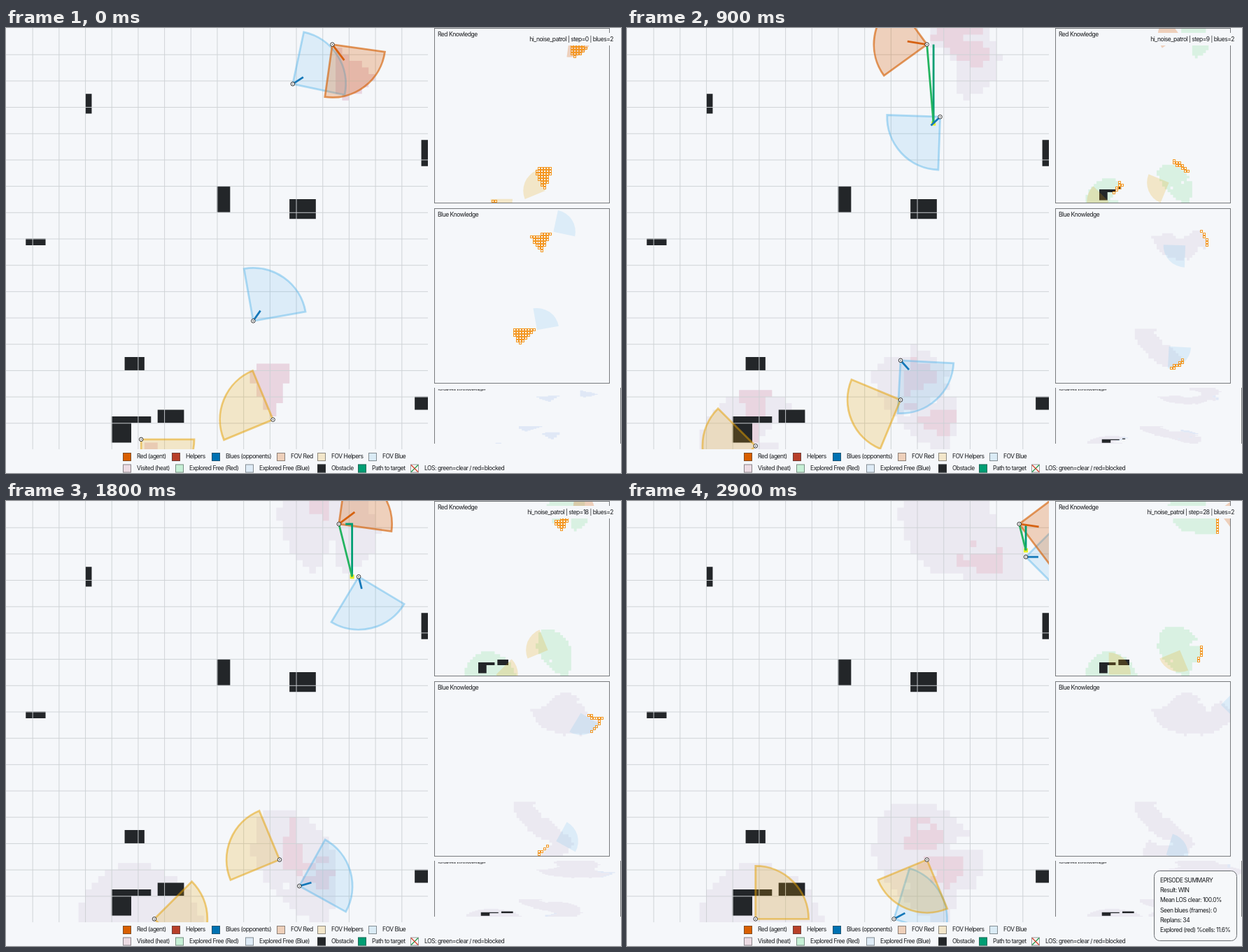
Animation, 879 px wide and 637 px high, one loop 3000 ms. Source, as an HTML page with a canvas:

```html
<!DOCTYPE html>
<html lang="en">
<head>
<meta charset="utf-8">
<title>Patrol</title>
<style>
html, body { margin: 0; width: 879px; height: 637px; overflow: hidden; background: #f5f7fa; }
canvas { display: block; }
</style>
</head>
<body>
<canvas id="stage" width="879" height="637"></canvas>
<script>
const ctx = document.getElementById('stage').getContext('2d');
const N = 64, LAST = 28, BG = '#f5f7fa', INK = '#232629', LILAC = '#ebe9f1';
const KEYS = [0, 6, 9, 14, 18, 25, 28];
const rad = deg => deg * Math.PI / 180;

// Panels: left, top, cell width, cell height
const MAP = [0, 0, 603 / N, 603 / N];
const REDP = [612.5, 0.5, 250 / N, 250 / N];
const BLUEP = [612.5, 258.5, 250 / N, 250 / N];
const SHARED = [612, 515, 267 / N, 80 / N];

// Cell, drawn heading and scanning direction of each agent at KEYS
const agents = [
  { team: 'blue', x: [43, 44, 47, 49, 53, 59, 60], y: [8, 12, 13, 10, 11, 6, 8],
    a: [-33, 121, 137, 41, 76, 64, 0], look: [143, -10, -20, -290, -322, -295, -250] },
  { team: 'blue', x: [37, 38, 41, 44, 44, 40, 40], y: [44, 48, 50, 54, 58, 63, 63],
    a: [-55, 27, 48, 53, -16, -72, -28], look: [163, 75, 65, 60, 125, 200, 200] },
  { team: 'help', x: [40, 41, 41, 41, 41, 43, 45], y: [59, 58, 56, 55, 54, 54, 54],
    a: [202.5, 202.5, 157.5, 157.5, 202.5, 157.5, 112.5], off: 22.5,
    look: s => -34 - 59 * Math.cos(2 * Math.PI * s / 5) },
  { team: 'help', x: [20, 19, 19, 20, 22, 20, 19], y: [62, 63, 63, 63, 63, 63, 63],
    a: [45, 225, 180, 90, 0, -45, -45], off: 0, look: [45, 247, 290, 360, 450, 450, 450] },
  { team: 'red', x: [49, 45, 45, 48, 50, 56, 59], y: [2, 2, 2, 3, 3, 3, 3],
    a: [53, 143, 189, 234, 323, 368, 368], look: [58, -22, -60, -90, -220, -250, -250] }
];
const target = { x: [43, 43, 46, 48, 52, 58, 60], y: [8, 13, 14, 9, 11, 6, 7] };
const style = {
  blue: { rgb: '86,180,233', fill: 0.16, line: 0.45, head: 'rgb(20,120,185)', len: 1.9 },
  help: { rgb: '230,159,0', fill: 0.2, line: 0.5 },
  red: { rgb: '213,94,0', fill: 0.25, line: 0.62, head: 'rgb(214,98,16)', len: 3 }
};
const walls = [[12, 10, 1, 3], [63, 17, 1, 4], [32, 24, 2, 4], [43, 26, 4, 3], [3, 32, 3, 1],
  [18, 50, 3, 2], [62, 56, 2, 2], [16, 59, 6, 1], [16, 60, 3, 3], [23, 58, 4, 2]];
const isWall = (x, y) => walls.some(([l, t, w, h]) => x >= l && x < l + w && y >= t && y < t + h);

function lerp(list, step) {
  let i = KEYS.length - 2;
  while (i > 0 && KEYS[i] > step) i--;
  return list[i] + (list[i + 1] - list[i]) * (step - KEYS[i]) / (KEYS[i + 1] - KEYS[i]);
}

function pose(o, step) {
  const p = { x: Math.round(lerp(o.x, step)) + 0.5, y: Math.round(lerp(o.y, step)) + 0.5, team: o.team };
  if (o.a) {
    let a = lerp(o.a, step);
    if (o.off !== undefined) a = Math.round((a - o.off) / 45) * 45 + o.off;
    p.a = rad(a);
  }
  return p;
}

// Scan the field once: step of first sight per cell, and heat after each step
const first = { red: new Array(N * N).fill(99), blue: new Array(N * N).fill(99) };
const heat = [];
for (let s = 0; s <= LAST; s++) {
  heat[s] = s ? heat[s - 1].map(h => h * 0.92) : new Array(N * N).fill(0);
  for (const o of agents) {
    const p = pose(o, s), side = o.team === 'blue' ? 'blue' : 'red';
    const look = rad(typeof o.look === 'function' ? o.look(s) : lerp(o.look, s));
    for (let i = 0; i < N * N; i++) {
      const dx = i % N + 0.5 - p.x, dy = Math.floor(i / N) + 0.5 - p.y, d = Math.hypot(dx, dy);
      if (d < 1 || d > 8.3 || Math.cos(Math.atan2(dy, dx) - look) < Math.cos(rad(24))) continue;
      first[side][i] = Math.min(first[side][i], s);
      if (side === 'red') heat[s][i]++;
    }
  }
}

function fillRects(P, list, color) {
  ctx.beginPath();
  for (const [x, y, w, h] of list) ctx.rect(P[0] + x * P[2], P[1] + y * P[3], w * P[2], h * P[3]);
  ctx.fillStyle = color;
  ctx.fill();
}

// Cells passing a test, joined into one rectangle per run
function runs(test) {
  const out = [];
  for (let y = 0; y < N; y++)
    for (let x = 0, from = -1; x <= N; x++) {
      const hit = x < N && test(y * N + x);
      if (hit && from < 0) from = x;
      if (!hit && from >= 0) { out.push([from, y, x - from, 1]); from = -1; }
    }
  return out;
}

const drawFound = (P, step) =>
  fillRects(P, runs(i => first.red[i] <= step && isWall(i % N, Math.floor(i / N))), INK);

function outlineCells(P, list) {
  ctx.strokeStyle = 'rgb(244,152,36)';
  ctx.lineWidth = 1;
  for (const [x, y, w] of list)
    for (let i = x; i < x + w; i++)
      ctx.strokeRect(Math.floor(P[0] + i * P[2]) + 0.5, Math.floor(P[1] + y * P[3]) + 0.5, 3, 3);
}

function wedge(P, p, edge) {
  const s = style[p.team], x = P[0] + p.x * P[2], y = P[1] + p.y * P[3];
  ctx.beginPath();
  ctx.moveTo(x, y);
  ctx.arc(x, y, 8.05 * P[2], p.a - Math.PI / 4, p.a + Math.PI / 4);
  ctx.closePath();
  ctx.fillStyle = `rgba(${s.rgb},${s.fill})`;
  ctx.fill();
  if (!edge) return;
  ctx.strokeStyle = `rgba(${s.rgb},${s.line})`;
  ctx.lineWidth = 2.8;
  ctx.stroke();
}

function line(pts, color, width) {
  ctx.beginPath();
  pts.forEach(([x, y]) => ctx.lineTo(x, y));
  ctx.strokeStyle = color;
  ctx.lineWidth = width;
  ctx.stroke();
}

function text(s, x, y, align = 'left') {
  ctx.fillStyle = '#17191c';
  ctx.textAlign = align;
  ctx.fillText(s, x, y);
}

function clipped(x, y, w, h, draw) {
  ctx.save();
  ctx.beginPath();
  ctx.rect(x, y, w, h);
  ctx.clip();
  draw();
  ctx.restore();
}

function drawMap(step, team) {
  const C = MAP[2], at = (x, y) => [x * C, y * C];
  const peak = Math.max(...heat[step]);
  fillRects(MAP, runs(i => first.red[i] <= step), LILAC);
  fillRects(MAP, runs(i => heat[step][i] > 0.6 * peak), 'rgba(232,200,213,.6)');
  fillRects(MAP, walls, INK);
  for (let i = 1; i < 16; i++) {
    const g = i * 4 * C + 0.47;
    line([[g, 0], [g, 603]], '#cdd2d5', 0.94);
    line([[0, g], [603, g]], '#cdd2d5', 0.94);
  }
  team.forEach(p => wedge(MAP, p, true));
  if (step > 0) {
    const r = team[4], t = pose(target, step), dx = Math.sign(t.x - r.x);
    fillRects(MAP, [[t.x - 0.32, t.y - 0.32, 0.64, 0.64]], '#e6f020');
    line([at(r.x + dx, r.y), at(t.x, r.y), at(t.x, t.y)], 'rgb(0,158,115)', 2.8);
    line([at(r.x, r.y), at(t.x, t.y)], 'rgb(36,180,96)', 2.8);
  }
  for (const p of team) {
    const s = style[p.team];
    if (s.head) line([at(p.x, p.y), at(p.x + s.len * Math.cos(p.a), p.y + s.len * Math.sin(p.a))], s.head, 2.8);
  }
  for (const p of team) {
    ctx.beginPath();
    ctx.arc(...at(p.x, p.y), 2.8, 0, 7);
    ctx.fillStyle = '#fff';
    ctx.fill();
    ctx.strokeStyle = '#333';
    ctx.lineWidth = 1;
    ctx.stroke();
    fillRects(MAP, [[p.x - 0.07, p.y - 0.07, 0.14, 0.14]], '#333');
  }
}

function drawPanel(P, side, step, team, title, color) {
  clipped(P[0], P[1], 250, 250, () => {
    fillRects(P, runs(i => first[side][i] < step), color);
    if (side === 'red') drawFound(P, step);
    team.forEach(p => { if ((p.team === 'blue') === (side === 'blue')) wedge(P, p); });
    outlineCells(P, runs(i => first[side][i] === step));
  });
  ctx.strokeStyle = '#777a7d';
  ctx.lineWidth = 1;
  ctx.strokeRect(P[0], P[1], 250, 250);
  text(title, 617, P[1] + 11.5);
}

function drawShared(step) {
  clipped(612, 515, 267, 80, () => {
    const known = i => Math.min(first.red[i], first.blue[i]);
    fillRects(SHARED, runs(i => known(i) < step), LILAC);
    fillRects(SHARED, runs(i => known(i) === step), '#e0e8f6');
    drawFound(SHARED, step);
    // The whole panel, title included, is squashed
    ctx.translate(0, 515);
    ctx.scale(1, 80 / 250);
    text('Shared Knowledge', 617, 14);
  });
  line([[612.5, 515], [612.5, 595]], '#777a7d', 1);
  line([[878.5, 515], [878.5, 595]], '#777a7d', 1);
}

const legend = [
  [167, 0, 'Red (agent)', '#d95f02'], [237, 0, 'Helpers', '#b8402a'], [294, 0, 'Blues (opponents)', '#0072b2'],
  [387, 0, 'FOV Red', '#eed0ba'], [445, 0, 'FOV Helpers', '#f2e6ca'], [518, 0, 'FOV Blue', '#daebf5'],
  [167, 1, 'Visited (heat)', '#ecdce4'], [242, 1, 'Explored Free (Red)', '#c6f0d6'],
  [342, 1, 'Explored Free (Blue)', '#deebf6'], [445, 1, 'Obstacle', INK],
  [503, 1, 'Path to target', '#009e73'], [578, 1, 'LOS: green=clear / red=blocked', '#fff']
];

function drawLegend() {
  for (const [x, row, label, color] of legend) {
    const y = 608 + row * 16.5;
    ctx.fillStyle = color;
    ctx.fillRect(x, y, 12, 12);
    ctx.strokeStyle = 'rgba(60,64,68,.55)';
    ctx.lineWidth = 1;
    ctx.strokeRect(x + 0.5, y + 0.5, 11, 11);
    if (color === '#fff') {
      line([[x + 1, y + 11], [x + 11, y + 1]], '#2a9d50', 1.5);
      line([[x + 1, y + 1], [x + 11, y + 11]], '#d94a3a', 1.5);
    }
    text(label, x + 20, y + 8);
  }
}

function drawSummary() {
  ctx.beginPath();
  ctx.roundRect(753.5, 529.5, 118, 100, 8);
  ctx.fillStyle = '#f6f8fa';
  ctx.fill();
  ctx.strokeStyle = '#666a6e';
  ctx.lineWidth = 1;
  ctx.stroke();
  ['EPISODE SUMMARY', 'Result: WIN', 'Mean LOS clear: 100.0%', 'Seen blues (frames): 0',
    'Replans: 34', 'Explored (red) %cells: 11.6%'].forEach((s, i) => text(s, 762, 546 + i * 14.2));
}

function draw(tick) {
  const step = Math.min(tick, LAST), team = agents.map(o => pose(o, step));
  ctx.fillStyle = BG;
  ctx.fillRect(0, 0, 879, 637);
  ctx.font = '8.5px Inter, sans-serif';
  ctx.letterSpacing = '-0.48px';
  clipped(0, 0, 603, 603, () => drawMap(step, team));
  drawPanel(REDP, 'red', step, team, 'Red Knowledge', '#d9f1e2');
  drawPanel(BLUEP, 'blue', step, team, 'Blue Knowledge', LILAC);
  drawShared(step);
  drawLegend();
  const left = step < 10 ? 743 : 738;
  ctx.fillStyle = BG;
  ctx.fillRect(left, 7, 873 - left, 18);
  text(`hi_noise_patrol | step=${step} | blues=2`, 868, 19, 'right');
  if (tick > LAST) drawSummary();
}

const start = performance.now();
function loop() {
  draw(Math.floor((performance.now() - start) % 3000 / 100));
  requestAnimationFrame(loop);
}
loop();
</script>
</body>
</html>
```
